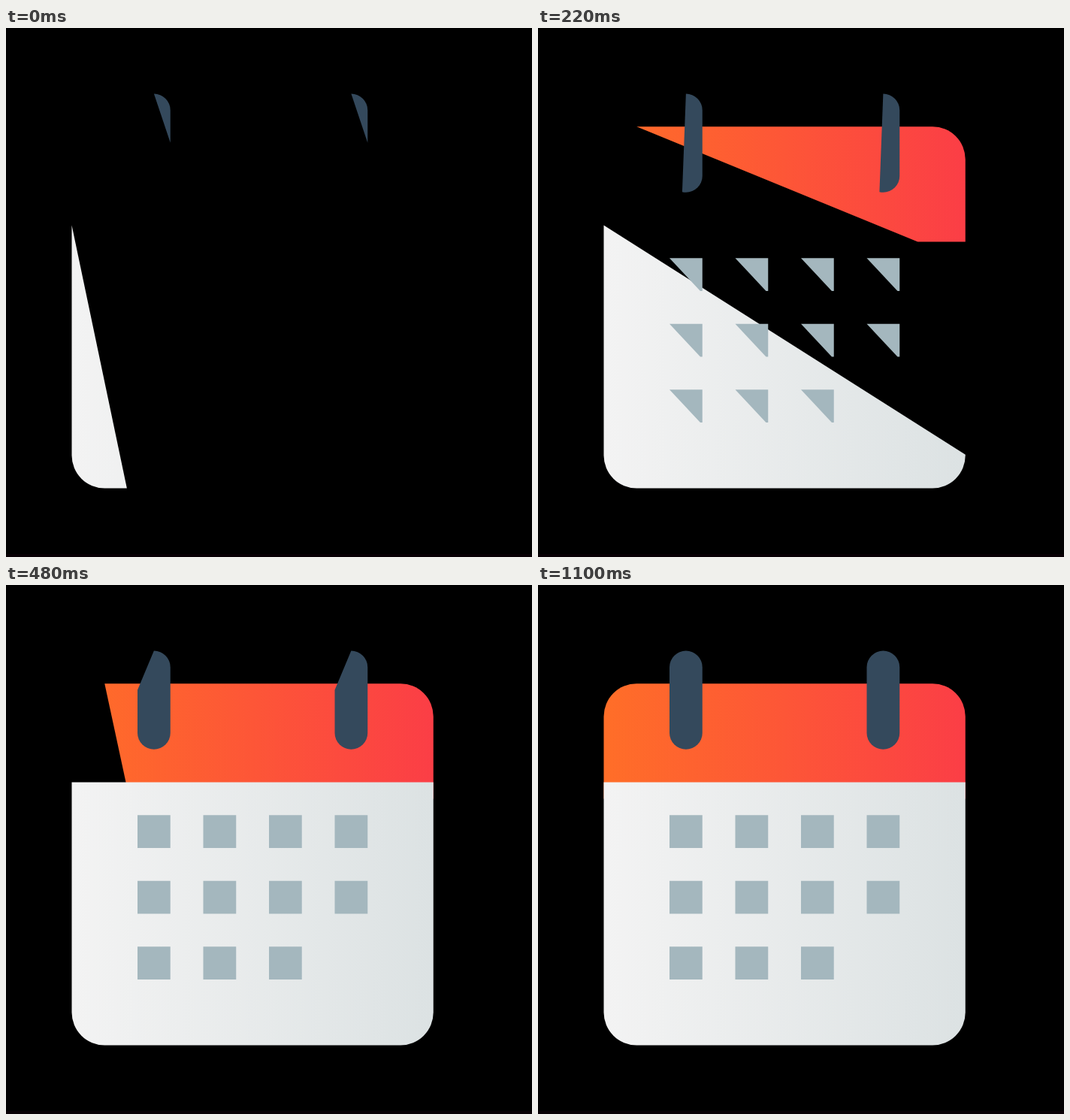
Write an HTML page with a canvas that moves like this. It is 700 px wide and 704 px high and loops after 1600 ms.

```html
<!DOCTYPE html>
<html lang="en">
<head>
<meta charset="utf-8">
<title>Calendar</title>
<style>
  html, body { margin: 0; width: 100%; height: 100%; overflow: hidden; background: #000; }
  canvas { display: block; width: 700px; height: 704px; }
</style>
</head>
<body>
<canvas id="stage" width="700" height="704"></canvas>
<script>
const ctx = document.getElementById('stage').getContext('2d');
const UNIT = 43.75, LOOP = 1600, STEP = 20, TAU = Math.PI * 2;

// [time, drawn share of each outline, speed per ms]
const KEYS = [
  [0, 0.249, 0.00099],
  [160, 0.434, 0.00131],
  [220, 0.516, 0.00131],
  [320, 0.638, 0.00112],
  [480, 0.793, 0.00081],
  [800, 0.9587, 0.00032],
  [1100, 1, 0]
];

function progress(t) {
  const i = KEYS.findIndex(k => t < k[0]);
  if (i < 0) return 1;
  const [t0, p0, m0] = KEYS[i - 1], [t1, p1, m1] = KEYS[i];
  const d = t1 - t0, u = (t - t0) / d, v = 1 - u;
  return p0 * (1 + 2 * u) * v * v + m0 * d * u * v * v
       + p1 * u * u * (3 - 2 * u) - m1 * d * u * u * v;
}

// An outline is a walk: line(length) or quarter turn(radius).
const line = len => ({ len });
const turn = r => ({ r, len: r * Math.PI / 2 });

function shape(fill, x, y, heading, side, steps) {
  const total = steps.reduce((sum, s) => sum + s.len, 0);
  return { fill, x, y, heading, side, steps, total };
}

function gradient(from, to) {
  const g = ctx.createLinearGradient(2, 0, 13, 0);
  g.addColorStop(0, from);
  g.addColorStop(1, to);
  return g;
}

const corner = turn(0), side = line(1), cap = turn(0.5);
const pin = x => shape('#34495c', x, 2, 0, 1,
  [cap, line(2), cap, cap, line(2), cap]);
const day = (x, y) => shape('#a4b7be', x, y, 0, 1,
  [side, corner, side, corner, side, corner, side]);

const shapes = [
  shape(gradient('#ff6e28', '#fb3e46'), 3, 3, 0, 1,
    [line(9), turn(1), line(2.5), corner, line(11), corner, line(2.5), turn(1)]),
  shape(gradient('#f3f3f3', '#dce2e3'), 2, 6, TAU / 4, -1,
    [line(7), turn(1), line(9), turn(1), line(7), corner, line(11)]),
  pin(4.5), pin(10.5)
];
for (let i = 0; i < 11; i++) {
  shapes.push(day(4 + 2 * (i % 4), 7 + 2 * Math.floor(i / 4)));
}

// Fills the first part of the outline, closed by a straight chord.
function fillPart(s, p) {
  let { x, y, heading: a } = s, left = s.total * p;
  ctx.beginPath();
  ctx.moveTo(x, y);
  for (const { len, r } of s.steps) {
    const part = Math.min(len, left);
    if (r === undefined) {
      x += part * Math.cos(a);
      y += part * Math.sin(a);
      ctx.lineTo(x, y);
    } else {
      const from = a - s.side * TAU / 4;
      const cx = x - r * Math.cos(from), cy = y - r * Math.sin(from);
      const to = from + s.side * (r ? part / r : 0);
      if (r) ctx.arc(cx, cy, r, from, to, s.side < 0);
      x = cx + r * Math.cos(to);
      y = cy + r * Math.sin(to);
      a += s.side * TAU / 4;
    }
    left -= part;
    if (left <= 0) break;
  }
  ctx.closePath();
  ctx.fillStyle = s.fill;
  ctx.fill();
}

function draw(time) {
  const t = Math.floor((time % LOOP) / STEP) * STEP;
  const p = progress(t);
  ctx.setTransform(1, 0, 0, 1, 0, 0);
  ctx.fillStyle = '#000';
  ctx.fillRect(0, 0, 700, 704);
  ctx.fillStyle = '#080004';
  ctx.fillRect(0, 700, 700, 4);
  ctx.scale(UNIT, UNIT);
  shapes.forEach(s => fillPart(s, p));
}

const start = performance.now();
function tick() {
  draw(performance.now() - start);
  requestAnimationFrame(tick);
}
tick();
</script>
</body>
</html>
```
